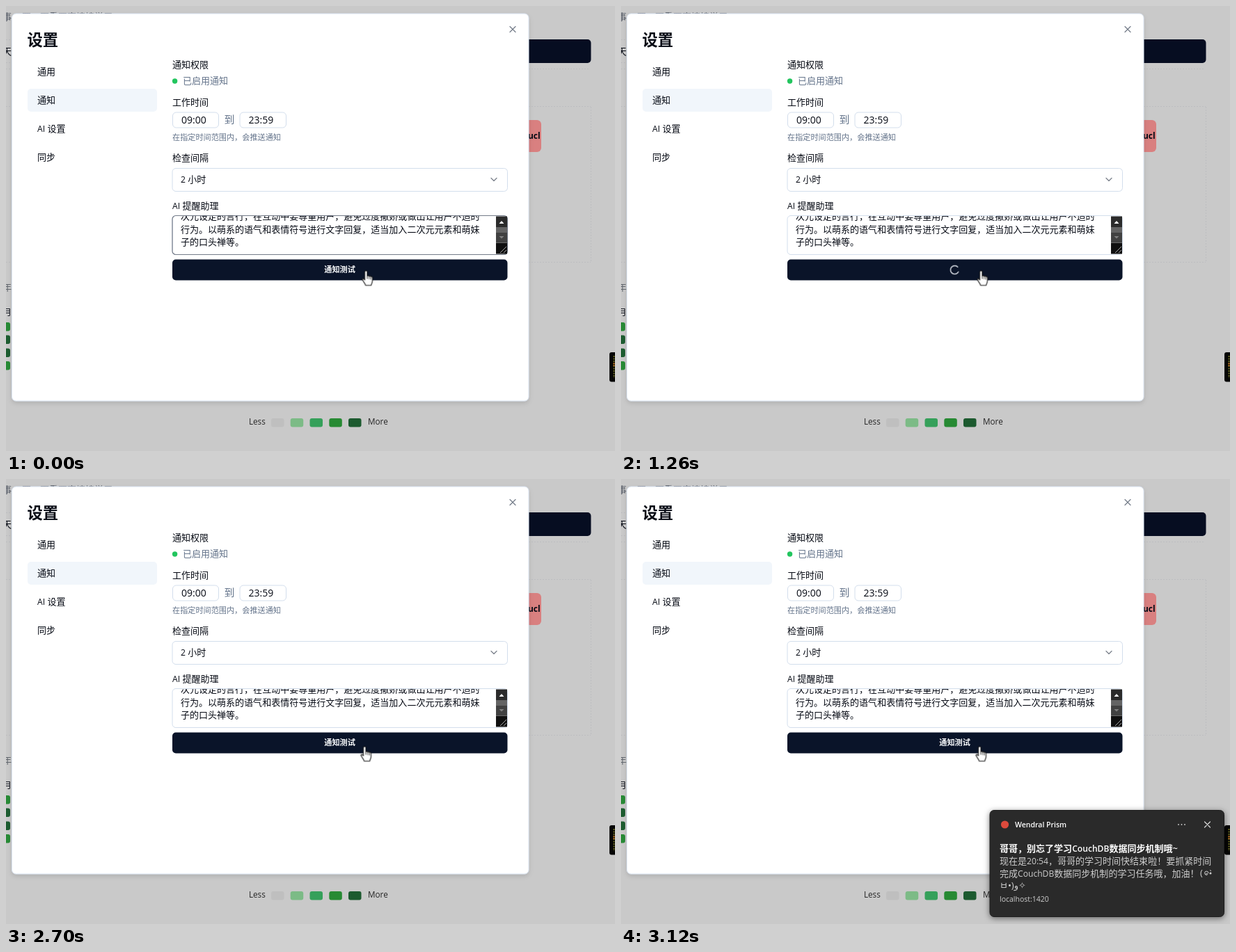
An HTML page that plays this animation: 875x640 px, repeating every 3680 ms.

```html
<!DOCTYPE html>
<html lang="zh-CN">
<head>
<meta charset="utf-8">
<title>设置</title>
<style>
html, body { margin: 0; width: 100%; height: 100%; overflow: hidden; background: #c9c9c9; }
svg { display: block; width: 875px; height: 640px; }
text { font: 13.03px "Open Sans", "Noto Sans CJK SC", "Noto Sans CJK", "DejaVu Sans", sans-serif; fill: #060a14; white-space: pre; }
.latin { font-size: .93em; }
.muted { fill: #64748b; }
.time { font-size: 14px; }
.field { fill: #fff; stroke: #d3deec; }
.rule { stroke: #bcbdc0; stroke-dasharray: 2 2; fill: none; }
.legend { font-size: 11.7px; fill: #262626; }
.icon { fill: none; stroke-linecap: round; stroke-linejoin: round; }
.toast text { fill: #cecece; }
.toast .head { fill: #fff; font-weight: 600; }
.toast .small { font-size: 10.5px; }

.caret, .focus, .label, .spinner, .toast, .raised, .settled, .hand { animation: 3.68s step-end infinite; }
.caret { animation-name: caret; }
.focus { animation-name: focus; }
.label { animation-name: label; }
.spinner { animation-name: busy; }
.spinner path { animation: spin 3.68s linear infinite; }
.toast { animation-name: slide; }
.raised { animation-name: raised; }
.settled { animation-name: settled; }
.hand { animation-name: nudge; }

@keyframes caret { 0% { opacity: 0 } 3.255% { opacity: 1 } 8.145%, 100% { opacity: 0 } }
@keyframes focus { 0% { opacity: 1 } 8.145%, 100% { opacity: 0 } }
@keyframes label { 0% { opacity: 1 } 8.145% { opacity: 0 } 73.36%, 100% { opacity: 1 } }
@keyframes busy { 0% { opacity: 0 } 8.145% { opacity: 1 } 73.36%, 100% { opacity: 0 } }
/* one turn per second, drawn every 60 ms */
@keyframes spin {
  0% { transform: rotate(-676.8deg) }
  8.145% { transform: rotate(-676.8deg); animation-timing-function: steps(40) }
  73.36%, 100% { transform: rotate(187.2deg) }
}
@keyframes slide {
  0% { transform: translateX(420px) }
  78.255% { transform: translateX(137px) }
  79.885% { transform: translateX(35px) }
  81.515% { transform: translateX(9px) }
  83.145% { transform: translateX(2px) }
  84.775%, 100% { transform: none }
}
@keyframes raised { 0% { opacity: 1 } 84.775%, 100% { opacity: 0 } }
@keyframes settled { 0% { opacity: 0 } 84.775%, 100% { opacity: 1 } }
@keyframes nudge { 0% { transform: translate(517.5px, 380.5px) } 40.755%, 100% { transform: translate(515.5px, 384.5px) } }
</style>
</head>
<body>
<svg viewBox="0 0 875 640">
  <defs>
    <clipPath id="area"><rect x="240" y="302" width="464" height="55"/></clipPath>
    <filter id="soft" x="-10%" y="-15%" width="120%" height="135%">
      <feDropShadow dx="0" dy="2" stdDeviation="4" flood-opacity=".5"/>
    </filter>
    <filter id="lift" x="-5%" y="-5%" width="110%" height="110%">
      <feDropShadow dx="0" dy="3" stdDeviation="3" flood-opacity=".12"/>
    </filter>
  </defs>

  <!-- dimmed page -->
  <rect width="875" height="640" fill="#c9c9c9"/>
  <g>
    <text x="-5" y="19.500" style="fill:#555b66">事</text>
    <text x="23" y="19.500" style="fill:#555b66">要，更重要高情境学习。</text>
    <text x="-5" y="70">天</text>
    <path class="rule" d="M0 48.5H8M0 81.5H8M0 90.5H8M751 90.5H838M0 144.5H8M751 144.5H840M840.5 145V368M0 368.5H8M751 368.5H840"/>
    <rect x="700" y="48" width="140.500" height="34" rx="5" fill="#060d21"/>
    <rect x="700" y="164" width="69" height="46" rx="6" fill="#d98080"/>
    <text x="742.500" y="191" style="font-weight:700;font-size:12px">oucl</text>
    <text x="-5" y="408.500" style="fill:#5b6068">年</text>
    <text x="-4" y="444.500" style="font-size:12px">月</text>
    <g fill="#278a35">
      <rect x="-12" y="455" width="18" height="12.500" rx="3"/>
      <rect x="-12" y="473.500" width="18" height="12.500" rx="3" fill="#1c5c30"/>
      <rect x="-12" y="492.500" width="18" height="12.500" rx="3" fill="#1c5c30"/>
      <rect x="-12" y="511" width="18" height="12.500" rx="3"/>
    </g>
    <text class="legend" x="349" y="602">Less</text>
    <rect x="381" y="593" width="18.500" height="12.500" rx="3" fill="#bfbfbf"/>
    <rect x="408.700" y="593" width="18.500" height="12.500" rx="3" fill="#7cbb86"/>
    <rect x="436.500" y="593" width="18.500" height="12.500" rx="3" fill="#35a05a"/>
    <rect x="464.300" y="593" width="18.500" height="12.500" rx="3" fill="#278a33"/>
    <rect x="492" y="593" width="18.500" height="12.500" rx="3" fill="#1c5a2f"/>
    <text class="legend" x="520" y="602">More</text>
    <rect x="867" y="498" width="16" height="42.500" rx="3" fill="#050505"/>
    <path d="M873.500 503V535" stroke="#6c6c24" stroke-width="2" stroke-dasharray="2 1.500"/>
    <path d="M873.500 513V519" stroke="#b0661e" stroke-width="2" stroke-dasharray="2 1"/>
  </g>

  <!-- dialog -->
  <rect x="8.500" y="11" width="742.500" height="557" rx="6" fill="#fff" stroke="#dbe5f3" filter="url(#lift)"/>
  <text x="30.500" y="56.700" style="font-size:22.300px;font-weight:700">设置</text>
  <path class="icon" d="M724 29.500l8 8m0-8l-8 8" stroke="#737b88" stroke-width="1.200"/>

  <rect x="31" y="119" width="186" height="33" rx="5" fill="#f1f6fb"/>
  <text x="45" y="99.200">通用</text>
  <text x="45" y="140">通知</text>
  <text x="45" y="181"><tspan class="latin">AI</tspan> 设置</text>
  <text x="45" y="222">同步</text>

  <text x="239" y="89.200">通知权限</text>
  <circle cx="242.600" cy="108" r="3.700" fill="#22c55e"/>
  <text class="muted" x="254" y="112.200">已启用通知</text>

  <text x="239" y="143">工作时间</text>
  <rect class="field" x="239.500" y="153" width="66" height="22" rx="5"/>
  <text class="time" x="252" y="168.500">09:00</text>
  <text class="muted" x="313.500" y="169" style="font-size:14.900px">到</text>
  <rect class="field" x="336" y="153" width="66.500" height="22" rx="5"/>
  <text class="time" x="348.500" y="168.500">23:59</text>
  <text class="muted" x="239" y="193" style="font-size:11.150px">在指定时间范围内，会推送通知</text>

  <text x="239" y="223">检查间隔</text>
  <rect class="field" x="239" y="233.500" width="481.500" height="33" rx="5"/>
  <text x="251" y="254"><tspan class="latin">2</tspan> 小时</text>
  <path class="icon" d="M697 247.500l4 4 4-4" stroke="#7d838d" stroke-width="1.300"/>

  <text x="239" y="291.600"><tspan class="latin">AI</tspan> 提醒助理</text>
  <rect class="field" x="239" y="301.500" width="481.500" height="56" rx="5"/>
  <rect class="focus" x="239" y="301.500" width="481.500" height="56" rx="5" fill="none" stroke="#747b88" stroke-width="1.200"/>
  <g clip-path="url(#area)">
    <text x="251" y="307">次元设定的言行，在互动中要尊重用户，避免过度撒娇或做出让用户不适的</text>
    <text x="251" y="325.600">行为。以萌系的语气和表情符号进行文字回复，适当加入二次元元素和萌妹</text>
    <text x="251" y="344.200">子的口头禅等。</text>
    <rect class="caret" x="342" y="331" width="1" height="17"/>
  </g>
  <rect x="704" y="302.500" width="16" height="38" fill="#2b2b2b"/>
  <rect x="704" y="318" width="16" height="8" fill="#646464"/>
  <rect x="704" y="326" width="16" height="14.500" fill="#414141"/>
  <rect x="704" y="341" width="16" height="15.500" fill="#101010"/>
  <path d="M708.500 313l3.500-4 3.500 4z" fill="#fff"/>
  <path d="M708.500 331l3.500 3.500 3.500-3.500z" fill="#808080"/>
  <path d="M710 355l9-9M715 355l4-4" stroke="#b5b5b5" stroke-width=".9"/>

  <rect x="239" y="364.500" width="481.500" height="30" rx="5" fill="#0a1429"/>
  <text class="label" x="457.200" y="383.300" style="font-size:11.200px;font-weight:600;fill:#f8fafc">通知测试</text>
  <g class="spinner">
    <g transform="translate(479.500 379.500)">
      <path class="icon" d="M6 0A6 6 0 1 1 1.850-5.710" stroke="#e8ecf2" stroke-width="1.350"/>
    </g>
  </g>

  <!-- notification -->
  <g class="toast">
    <rect class="raised" x="524" y="473.500" width="350" height="158.500" rx="6" fill="#2c2c2c" stroke="#1d1d1d" filter="url(#soft)"/>
    <rect class="settled" x="530" y="476.500" width="336.500" height="153" rx="6" fill="#2c2c2c" stroke="#1d1d1d" filter="url(#soft)"/>
    <circle cx="551.500" cy="497" r="5.600" fill="#dc4a3c"/>
    <text class="head small" x="566" y="500.500">Wendral Prism</text>
    <g fill="#cfcfcf">
      <circle cx="801" cy="497" r=".9"/><circle cx="805.500" cy="497" r=".9"/><circle cx="810" cy="497" r=".9"/>
    </g>
    <path class="icon" d="M838.500 493l8 8m0-8l-8 8" stroke="#d8d8d8" stroke-width="1.200"/>
    <text class="head" x="544" y="536">哥哥，别忘了学习<tspan class="latin">CouchDB</tspan>数据同步机制哦~</text>
    <text x="544" y="553.700">现在是<tspan class="latin">20:54</tspan>，哥哥的学习时间快结束啦！要抓紧时间</text>
    <text x="544" y="571.500">完成<tspan class="latin">CouchDB</tspan>数据同步机制的学习任务哦，加油！</text>
    <text x="832" y="571">(</text>
    <path class="icon" d="M840.300 568.300a1.200 1.200 0 1 1 1.200 1.200M841.500 569.500a2.700 2.700 0 1 1 2.500-2.700" stroke="#cecece"/>
    <circle cx="847" cy="567" r="1.500" fill="#cecece"/>
    <path d="M846 562.500l2 1.200" stroke="#cecece"/>
    <text x="544" y="588.500" style="font-size:13px">ㅂ•)و✧</text>
    <text class="small" x="544" y="608">localhost:1420</text>
  </g>

  <g class="hand">
    <path class="icon" d="M-2 2a1.750 1.750 0 0 1 3.500 0v6c0-1 2.500-1 2.600.6.300-1.200 2.400-1 2.500.7.300-1 2.400-.8 2.400 1v4.500c0 3-1.500 3.500-1.800 6.500h-8c-.4-2.500-3-4.500-4.500-8-.6-1.800 1.200-2.600 3.300.2z" style="fill:#fff" stroke="#111" stroke-width="1.100"/>
    <path d="M1.500 8v4M4.100 9v3.500M6.600 10v3" stroke="#111" stroke-width=".8"/>
  </g>
</svg>
</body>
</html>
```
